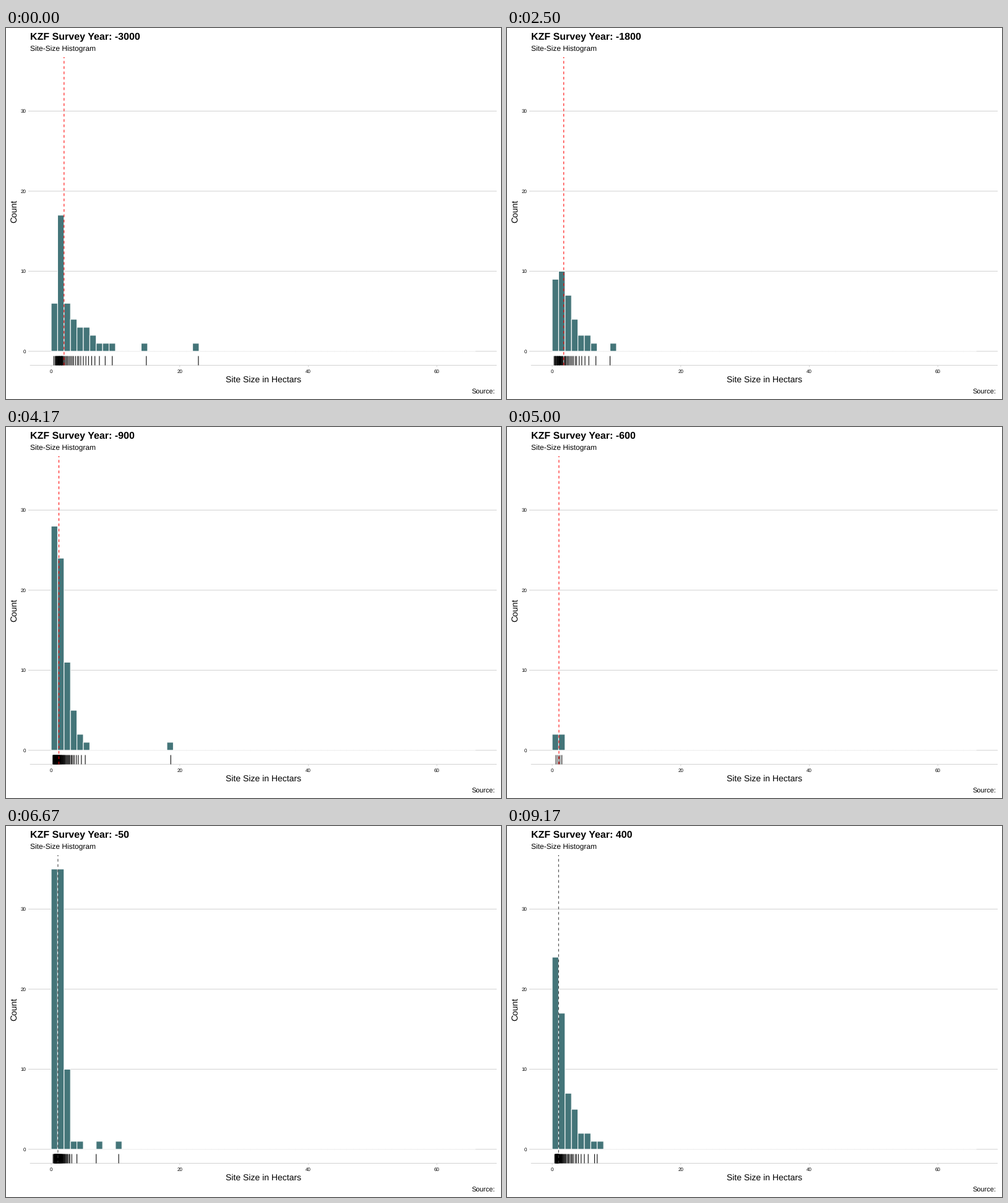
These frames come from a looping animation (800x600 px, 10 s). A matplotlib script:

```python
import numpy as np
import matplotlib.pyplot as plt
from matplotlib.animation import FuncAnimation
from matplotlib.collections import LineCollection, PolyCollection

plt.rcParams["font.family"] = "Liberation Sans"
plt.rcParams["text.hinting"] = "none"

W, H, DPI = 800, 600, 100
PT = 72 / DPI                      # points per pixel
LOOP_MS, FRAMES = 10000, 400
LEFT, RIGHT, TOP, BOTTOM = 38.75, 793, 47, 545.5
BINS, MAX_COUNT = 66, 35
X_UNIT = (RIGHT - LEFT) / (BINS * 1.1)
Y_UNIT = (BOTTOM - TOP) / (MAX_COUNT * 1.1)
RUG_HEIGHT = 0.03 * (BOTTOM - TOP)
SMALLEST = 0.2                     # hectares
LINE = 1.07 * PT
GRID, TEAL, RED, DARK, CRIMSON = "#d4d4d4", "#447579", "#ff0000", "#404040", "#bf2a48"

# year, line colour, then the size distribution:
# sites, centre, spread below it, tail length above it, largest sites
PERIODS = [
    (-3000, RED, 46, 1.98, .455, 3.4, [14.8, 22.9]),
    (-2500, RED, 46, 2.1, .46, 3.4, [22.9, 65.5]),
    (-2000, DARK, 46, 2.4, .68, 4.5, [18.6, 19, 22.5, 65.5]),
    (-1800, RED, 36, 1.8, .7, 2, []),
    (-1400, CRIMSON, 33, 1.62, .9, 1.95, [16]),
    (-900, RED, 72, 1.2, .6, 1.3, [18.6]),
    (-600, RED, 4, 1.05, .4, .35, []),
    (-300, RED, 76, 1.05, .35, 1.1, [18.6]),
    (-50, DARK, 84, 1.04, .34, .85, [4, 7, 10.5]),
    (200, RED, 5, .5, .4, .2, [7]),
    (300, DARK, 60, 1.04, .33, 1.85, [7]),
    (400, DARK, 59, 1.04, .33, 1.85, [7]),
]


def px(hectares):
    return LEFT + (np.asarray(hectares) + BINS * 0.05) * X_UNIT


def py(count):
    return BOTTOM - (np.asarray(count) + MAX_COUNT * 0.05) * Y_UNIT


def site_sizes(n, centre, spread, tail, largest):
    """Evenly spaced quantiles: power law of the odds below, exponential above."""
    p = (np.arange(n) + 0.5) / n
    low = SMALLEST + (centre - SMALLEST) * (p / (1 - p)) ** spread
    high = centre - tail * np.log(2 * (1 - p))
    sizes = np.where(p < 0.5, low, high).round(1)
    sizes[n - len(largest):] = largest
    return sizes


def bar_outline(i, count):
    x0, x1, base, top = px(i), px(i + 1), py(0), py(count)
    return [(x0, base), (x0, top), (x1, top), (x1, base)]


fig = plt.figure(figsize=(W / DPI, H / DPI), dpi=DPI, facecolor="white")
ax = fig.add_axes([0, 0, 1, 1])
ax.set(xlim=(0, W), ylim=(H, 0))
ax.axis("off")


def label(x, y, text, size, ha="left", **kw):
    return ax.text(x, y, text, fontsize=size * PT, ha=ha, va="baseline", color="black", **kw)


def rule(xs, ys, color=GRID, **kw):
    return ax.plot(xs, ys, color=color, lw=LINE, solid_capstyle="butt",
                   dash_capstyle="butt", snap=False, **kw)[0]


for count in (0, 10, 20, 30):
    y = py(count)
    rule([LEFT - 2.75, RIGHT], [y, y], zorder=1)
    label(32.5, y + 2.9, str(count), 8, "right")
for size in (0, 20, 40, 60):
    x = px(size)
    rule([x, x], [BOTTOM, BOTTOM + 2.75], zorder=1)
    label(x, 558, str(size), 8, "center")
rule([LEFT, RIGHT], [BOTTOM, BOTTOM], zorder=1)

title = label(38.75, 19, "", 16, weight="bold")
label(38.75, 38, "Site-Size Histogram", 12)
label((LEFT + RIGHT) / 2, 573, "Site Size in Hectars", 14, "center")
label(17, (TOP + BOTTOM) / 2, "Count", 14, "center", rotation=90, rotation_mode="anchor")
label(790, 591, "Source:", 11, "right")

bars = PolyCollection([], facecolors=TEAL, edgecolors="white", linewidths=LINE,
                      joinstyle="miter", snap=False, zorder=2)
rug = LineCollection([], colors="black", linewidths=LINE, capstyle="butt",
                     snap=False, zorder=3)
for collection in (bars, rug):
    ax.add_collection(collection, autolim=False)
median_line = rule([0, 0], [BOTTOM, TOP], RED, linestyle=(0, (4, 4)), zorder=4)
ax.set(xlim=(0, W), ylim=(H, 0))


def draw(frame):
    # The offset lets each change fall on the tick at or just before its time.
    period = int((frame + 0.7) * len(PERIODS) / FRAMES)
    year, color, *distribution = PERIODS[period]
    sizes = site_sizes(*distribution)
    counts = np.histogram(sizes, bins=np.arange(BINS + 1))[0]
    title.set_text(f"KZF Survey Year: {year}")
    bars.set_verts([bar_outline(i, count) for i, count in enumerate(counts)])
    rug.set_segments([[(x, BOTTOM), (x, BOTTOM - RUG_HEIGHT)] for x in px(sizes)])
    median_line.set_xdata([px(np.median(sizes))] * 2)
    median_line.set_color(color)
    return [title, bars, rug, median_line]


anim = FuncAnimation(fig, draw, frames=FRAMES, interval=LOOP_MS / FRAMES,
                     repeat=True, repeat_delay=0, blit=False)
plt.show()
```
